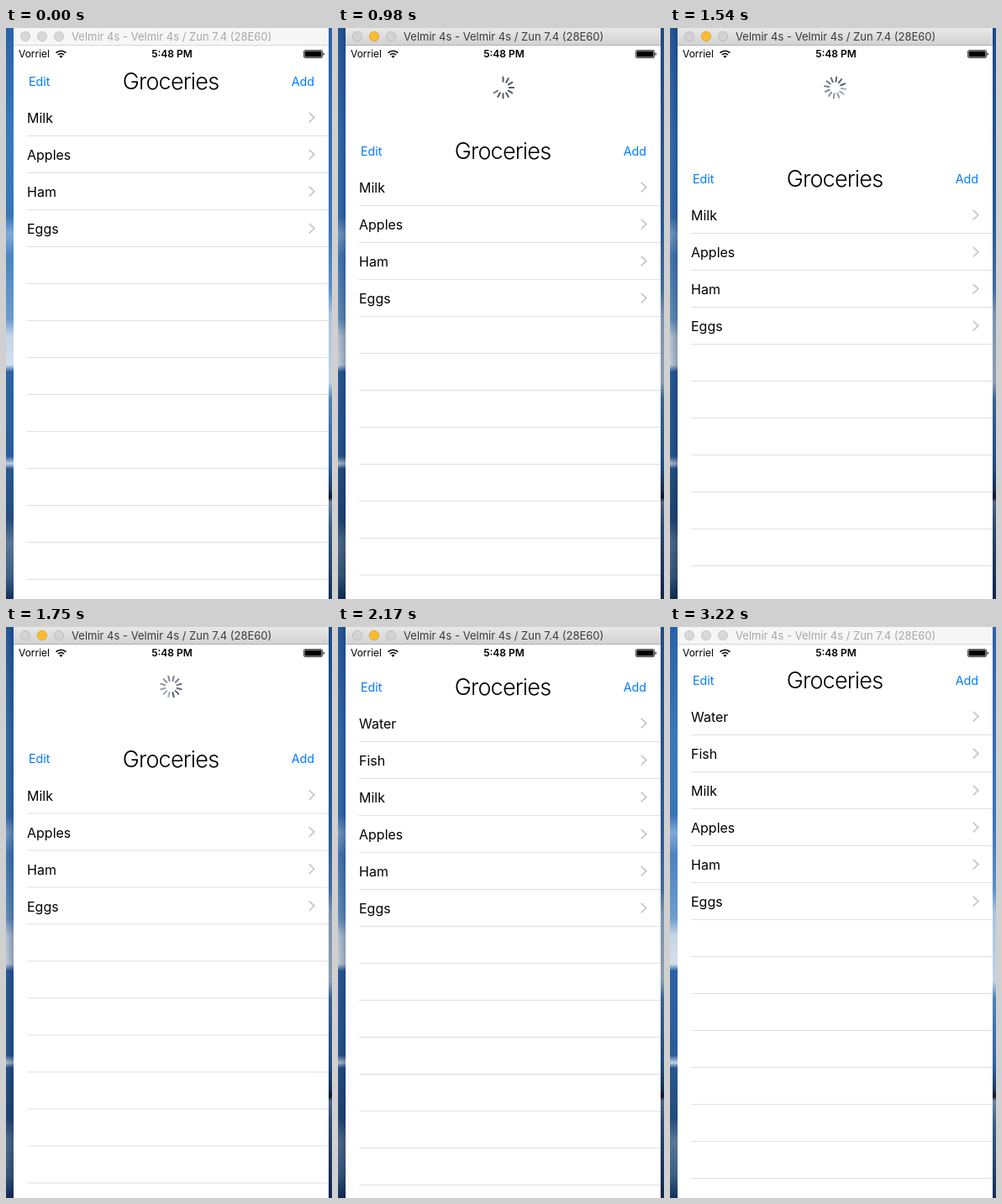
Animation of 388 by 680 pixels, one loop 3290 ms. Source, as an HTML page:

```html
<!DOCTYPE html>
<html lang="en">
<head>
<meta charset="utf-8">
<title>Pull to refresh</title>
<style>
  html, body { margin: 0; width: 100%; height: 100%; overflow: hidden; background: #fff; }
  svg { display: block; width: 388px; height: 680px; }
  text { font-family: Inter, Roboto, sans-serif; font-optical-sizing: none; white-space: pre; }
  .status { font-size: 12px; }
  .button { font-size: 14.3px; fill: #007aff; }
  .heading { font-size: 27px; font-weight: 300; letter-spacing: -.8px; }
  .item { font-size: 16px; }
</style>
</head>
<body>
<svg id="stage" viewBox="0 0 388 680">
  <defs>
    <linearGradient id="skyLeft" x2="0" y2="1">
      <stop offset="0" stop-color="#2a62a9"/><stop offset=".2" stop-color="#3a78bd"/>
      <stop offset=".33" stop-color="#3875bb"/><stop offset=".36" stop-color="#7fa9d6"/>
      <stop offset=".4" stop-color="#4a84c3"/><stop offset=".51" stop-color="#6d9ccc"/>
      <stop offset=".54" stop-color="#c5d5e6"/><stop offset=".59" stop-color="#d3dfec"/>
      <stop offset=".602" stop-color="#2b62a5"/><stop offset=".75" stop-color="#2a5c9b"/>
      <stop offset=".763" stop-color="#c3d1e0"/><stop offset=".772" stop-color="#28578f"/>
      <stop offset=".86" stop-color="#244b7d"/><stop offset=".9" stop-color="#587696"/>
      <stop offset=".96" stop-color="#3d5f85"/><stop offset="1" stop-color="#12305a"/>
    </linearGradient>
    <linearGradient id="skyRight" x2="0" y2="1">
      <stop offset="0" stop-color="#2a62a9"/><stop offset=".35" stop-color="#3b77bb"/>
      <stop offset=".46" stop-color="#5d90c8"/><stop offset=".5" stop-color="#a9c3df"/>
      <stop offset=".62" stop-color="#c3d3e4"/><stop offset=".65" stop-color="#4f82b8"/>
      <stop offset=".77" stop-color="#2d609d"/><stop offset=".81" stop-color="#1d3a5f"/>
      <stop offset=".822" stop-color="#0b1420"/><stop offset=".83" stop-color="#69839f"/>
      <stop offset=".87" stop-color="#3c5d84"/><stop offset="1" stop-color="#142f55"/>
    </linearGradient>
    <linearGradient id="activeBar" x2="0" y2="1">
      <stop offset="0" stop-color="#e8e8e8"/><stop offset="1" stop-color="#d2d2d2"/>
    </linearGradient>
    <linearGradient id="shadow">
      <stop offset="0" stop-color="#001030" stop-opacity=".1"/>
      <stop offset="1" stop-color="#001030" stop-opacity=".32"/>
    </linearGradient>
  </defs>

  <rect width="9" height="680" fill="url(#skyLeft)"/>
  <rect x="384" width="4" height="680" fill="url(#skyRight)"/>
  <g id="windowShadow">
    <rect width="9" height="680" fill="url(#shadow)"/>
    <rect x="384" width="4" height="680" fill="#001030" opacity=".28"/>
  </g>
  <rect x="9" width="375" height="680" fill="#fff"/>

  <rect id="bar" x="9" width="375" height="20"/>
  <rect id="barEdge" x="9" y="20" width="375" height="1"/>
  <g id="lights" stroke-width="1"></g>
  <text id="windowTitle" x="78" y="15" font-size="13">Velmir 4s - Velmir 4s / Zun 7.4 (28E60)</text>

  <text class="status" x="15" y="35">Vorriel</text>
  <g fill="none" stroke="#000" stroke-width="1.7">
    <path d="M59.6 29.7a8.3 8.3 0 0 1 11.8 0M61.9 32a5.1 5.1 0 0 1 7.2 0"/>
    <path d="M65.5 35.8l-2-2.1a2.8 2.8 0 0 1 4 0z" fill="#000" stroke="none"/>
  </g>
  <text class="status" x="197.5" y="35" text-anchor="middle" font-weight="600">5:48 PM</text>
  <rect x="354.5" y="26.5" width="22" height="9" rx="1.5" fill="none" stroke="#000" stroke-width=".7"/>
  <rect x="355.5" y="27.5" width="20" height="7" rx=".6"/>
  <rect x="377.5" y="29.5" width="1.2" height="3" rx=".6"/>

  <g id="spinner" stroke="#515b68" stroke-width="2" stroke-linecap="round"></g>

  <g id="list">
    <text class="button" x="27" y="68.5">Edit</text>
    <text class="heading" x="196" y="73" text-anchor="middle">Groceries</text>
    <text class="button" x="367" y="68.5" text-anchor="end">Add</text>
    <g id="lines" fill="#e0e0e2"></g>
    <g id="before"></g>
    <g id="after"></g>
  </g>
</svg>

<script>
const LOOP = 3290, STEP = 70, ROW = 44;
const FOCUS = 560, SPIN = 1330, RELEASE = 1820, RELOAD = 1890, REST = 2450, BLUR = 3220;
const $ = id => document.getElementById(id);
const clamp = v => Math.max(0, Math.min(1, v));

function add(parent, tag, attributes, text = '') {
  const node = document.createElementNS('http://www.w3.org/2000/svg', tag);
  for (const key in attributes) node.setAttribute(key, attributes[key]);
  node.textContent = text;
  return parent.appendChild(node);
}

function addRows(group, names) {
  names.forEach((name, i) => {
    const y = 107 + i * ROW;
    add(group, 'text', { class: 'item', x: 25, y: y + 6 }, name);
    add(group, 'path', { d: `M360.7 ${y - 6.2}l6.2 5.8l-6.2 5.8`, fill: 'none', stroke: '#c7c7cc', 'stroke-width': 1.8 });
  });
}

const staples = ['Milk', 'Apples', 'Ham', 'Eggs'];
addRows($('before'), staples);
addRows($('after'), ['Water', 'Fish', ...staples]);
for (let i = 0; i < 13; i++) add($('lines'), 'rect', { x: 25, y: 128 + i * ROW, width: 359, height: 1 });

const lights = [23, 43, 63].map(cx => add($('lights'), 'circle', { cx, cy: 10, r: 5.6 }));
const ticks = Array.from({ length: 12 }, (_, i) =>
  add($('spinner'), 'path', { d: 'M0-7.3V-12.6', transform: `rotate(${i * 30})` }));

// Finger position while dragging: [time, offset]
const drag = [[490, 0], [560, 1], [700, 20], [840, 52], [980, 83], [1120, 109], [1260, 129],
  [1330, 132], [1470, 124], [1610, 107.5], [1750, 93.5], [RELEASE, 88]];

function dragOffset(t) {
  const slope = i => {
    const a = drag[Math.max(0, i - 1)], b = drag[Math.min(drag.length - 1, i + 1)];
    return (b[1] - a[1]) / (b[0] - a[0]);
  };
  const i = drag.findIndex(key => key[0] > t) - 1;
  const [t0, y0] = drag[i], [t1, y1] = drag[i + 1];
  const span = t1 - t0, u = (t - t0) / span, v = 1 - u;
  return v * v * ((1 + 2 * u) * y0 + u * span * slope(i))
       + u * u * ((3 - 2 * u) * y1 - v * span * slope(i + 1));
}

function scrollOffset(t) {
  if (t < FOCUS || t >= REST) return 0;
  if (t < RELEASE) return dragOffset(t);
  const x = (t - RELEASE) * .0115; // critically damped return
  return 88 * (1 + x) * Math.exp(-x);
}

function drawSpinner(t, offset) {
  const visible = t >= FOCUS && t < 2030;
  const spinning = t >= SPIN;
  const fade = 1 - clamp((t - RELEASE) / 210);
  const angle = spinning ? (t - SPIN) / 28 : 0;
  const lead = Math.floor((t - SPIN) / 83);
  $('spinner').setAttribute('opacity', visible ? fade : 0);
  $('spinner').setAttribute('transform', `translate(196.5 71) rotate(${angle}) scale(${.4 + .6 * fade})`);
  ticks.forEach((tick, i) => {
    const age = (lead - i + 120) % 12;
    tick.setAttribute('opacity', spinning ? 1 - age * .045 : clamp((offset - 17) / 7.5 - i));
  });
}

function drawWindow(active) {
  $('windowShadow').setAttribute('opacity', active ? 1 : 0);
  $('bar').setAttribute('fill', active ? 'url(#activeBar)' : '#f6f6f6');
  $('barEdge').setAttribute('fill', active ? '#b3b3b3' : '#d8d8d8');
  $('windowTitle').setAttribute('fill', active ? '#3c3c3c' : '#a8a8a8');
  lights.forEach((light, i) => {
    const yellow = active && i === 1;
    light.setAttribute('fill', yellow ? '#fdbd2e' : active ? '#d3d2d4' : '#d8d8d8');
    light.setAttribute('stroke', yellow ? '#e0a32c' : active ? '#bdbcbf' : '#c8c8c8');
  });
}

function draw(now) {
  const t = Math.floor(now % LOOP / STEP) * STEP;
  const offset = Math.round(scrollOffset(t) * 2) / 2;
  drawWindow(t >= FOCUS && t < BLUR);
  drawSpinner(t, offset);
  $('list').setAttribute('transform', `translate(0 ${offset})`);
  $('before').setAttribute('display', t < RELOAD ? 'inline' : 'none');
  $('after').setAttribute('display', t < RELOAD ? 'none' : 'inline');
}

let start;
function tick(now) {
  start ??= now;
  draw(now - start);
  requestAnimationFrame(tick);
}
draw(0);
requestAnimationFrame(tick);
</script>
</body>
</html>
```
